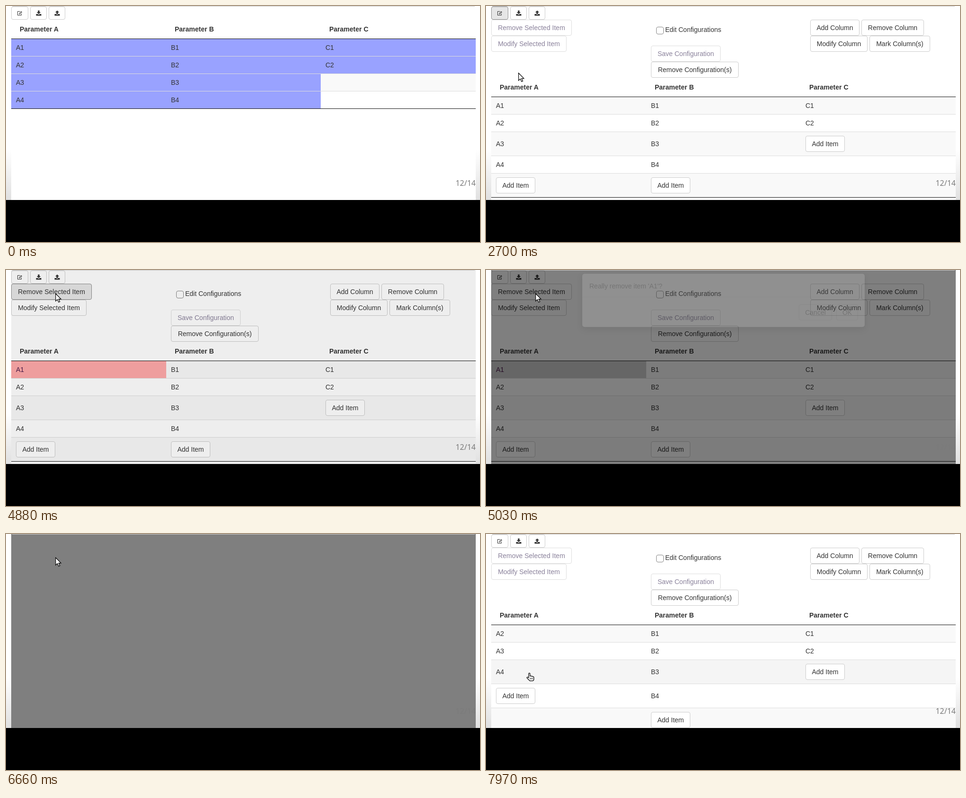
An HTML page for the animation above (8000 ms loop, 1000 by 500 pixels).

```html
<!DOCTYPE html>
<html lang="en">
<head>
<meta charset="utf-8">
<title>Parameter table</title>
<style>
html, body { margin: 0; width: 100%; height: 100%; overflow: hidden; background: #fff; }
#stage { position: relative; width: 1000px; height: 500px; overflow: hidden; color: #333;
  background: linear-gradient(#fff 305px, #e0e0e0 411px);
  font: 14px/20px "Liberation Sans", Arial, sans-serif; white-space: nowrap; }
#stage div, #stage svg { position: absolute; box-sizing: border-box; }
.layer { left: 0; top: 0; width: 1000px; height: 500px; }
#page { clip-path: inset(0 9px 89px 11px); background: #fff; }
#floor { left: 0; top: 411px; width: 1000px; height: 89px; background: #000; }
#edge { left: 13px; top: 0; width: 976px; height: 1px; background: #c8c8c8; }
#count { right: 9px; top: 364px; font: 16px/22px "Noto Sans", "Open Sans", sans-serif; color: #7b7b7b; }
.btn { border: 1px solid #ccc; border-radius: 4px; background: #fff; text-align: center; padding: 6px 0; }
.btn.off { opacity: .65; color: #4c3f66; }
.btn.hover { background: #e6e6e6; border-color: #adadad; }
.btn.focus { background: #e6e6e6; border-color: #8c8c8c; }
.btn.down { background: #d4d4d4; border-color: #8c8c8c; box-shadow: inset 0 3px 5px rgba(0,0,0,.125); }
.btn svg { left: 11px; top: 7px; }
.head { font-weight: 700; }
.row { border-top: 1px solid #ddd; }
.row.first { border-top-color: #111; }
.row.odd { background: #f9f9f9; }
.row.over { background: #f5f5f5; }
.fill { background: #99a2ff; }
.pick { background: #ffa9a9; }
.line { background: #111; height: 1px; left: 11px; width: 980px; }
#box { border: 1px solid #858585; border-radius: 4px; background: #fff; }
#tip { background: #000; color: #fff; border-radius: 4px; font-size: 12px; line-height: 22px; text-align: center; }
#tip::before { content: ""; position: absolute; left: -5px; top: 6px; border: solid transparent;
  border-width: 5px 5px 5px 0; border-right-color: #000; }
#modal { background: #fff; border: 1px solid rgba(0,0,0,.2); border-radius: 6px;
  background-clip: padding-box; box-shadow: 0 5px 15px rgba(0,0,0,.5); }
</style>
</head>
<body>
<div id="stage">
  <div id="page" class="layer">
    <div id="body" class="layer"></div>
    <div id="shade" class="layer" style="background:#000"></div>
    <div id="dialog" class="layer"></div>
    <div id="edge"></div>
  </div>
  <div id="count">12/14</div>
  <div id="floor"></div>
  <svg id="hand" width="18" height="20" viewBox="0 0 18 20">
    <path d="M5 10V2.3Q5 .7 6.4 .7T7.9 2.3V7Q9.3 6.2 10.6 7.4 12 6.8 13.2 8 15.9 7.6 15.9 10V13.5Q15.9 17.2 12.5 17.2H7.5L2.6 12.2Q.6 10.6 1.6 9.5 2.8 8.5 5 10.6Z"
      fill="#fff" stroke="#000" stroke-width="1.3"/>
    <path d="M8.3 10.5v3.5M10.7 10.5v3.5M13.1 10.5v3.5" stroke="#000" stroke-width=".9"/>
  </svg>
  <svg id="arrow" width="14" height="21" viewBox="0 0 14 21">
    <path d="M.7 1V17L4.4 13.6 7 19.3 9.6 18.2 7.1 12.6H12Z" fill="#fff" stroke="#000" stroke-width="1.2"/>
  </svg>
</div>
<script>
const $ = id => document.getElementById(id);
const body = $('body');
const COLS = [11, 338, 664, 991];

function el(parent, cls, x, y, w, h, html = '') {
  const d = document.createElement('div');
  d.className = cls;
  d.style.cssText = `left:${x}px;top:${y}px;` + (w ? `width:${w}px;height:${h}px` : '');
  d.innerHTML = html;
  parent.append(d);
  return d;
}
const layer = parent => el(parent, 'layer', 0, 0, 1000, 500);
const button = (parent, text, x, y, w, h = 34, cls = '') => el(parent, 'btn ' + cls, x, y, w, h, text);
const icon = d => `<svg width="12" height="12" viewBox="0 0 12 12" fill="#333"><path d="${d}"/></svg>`;

const TRAY = 'M.5 8H3.6L6 9.4 8.4 8H11.5V11.5H.5Z';
const PENCIL = 'M1 3Q1 2 2 2H7L6 3H2V10H9V8L10 7V10Q10 11 9 11H2Q1 11 1 10ZM4.5 8.5V6.5L9 2 11 4 6.5 8.5ZM5.3 7V7.8H6L9.5 4.2 8.8 3.5Z';

// rows: [height, a, b, c]; "+" stands for an Add Item button
function table(parent, top, rows, filled) {
  ['A', 'B', 'C'].forEach((c, i) => el(parent, 'head', COLS[i] + 18, top - 30, 0, 0, 'Parameter ' + c));
  let y = top;
  const list = rows.map(([h, ...cells], r) => {
    const row = el(parent, 'row' + (r % 2 ? '' : ' odd') + (r ? '' : ' first'), 11, y, 980, h);
    const out = { row, y, end: y + h, cells: [] };
    cells.forEach((text, c) => {
      const x = COLS[c];
      const cell = el(parent, filled && text ? 'fill' : '', x, y + 1, COLS[c + 1] - x, h - 1);
      if (text === '+') button(cell, 'Add Item', 10, 8, 83);
      else el(cell, '', 10, (h - 21) / 2, 0, 0, text);
      out.cells.push(cell);
    });
    y += h;
    return out;
  });
  el(parent, 'line', 11, y, 980, 1);
  return list;
}

const bar = layer(body);
const edit = button(bar, icon(PENCIL), 11, 1, 36, 28);
button(bar, icon('M4.3 .5H7.7V4H10.2L6 8.2 1.8 4H4.3Z' + TRAY), 51, 1, 35, 28);
button(bar, icon('M4.3 8V4.5H1.8L6 .5 10.2 4.5H7.7V8Z' + TRAY), 90, 1, 35, 28);

const tools = layer(body);
const remove = button(tools, 'Remove Selected Item', 11, 29, 170);
const modify = button(tools, 'Modify Selected Item', 11, 63, 159);
el(tools, '', 359, 44, 16, 16).id = 'box';
el(tools, '', 378, 40, 0, 0, 'Edit Configurations');
button(tools, 'Save Configuration', 348, 84, 147, 34, 'off');
button(tools, 'Remove Configuration(s)', 348, 118, 185);
button(tools, 'Add Column', 684, 29, 104);
button(tools, 'Remove Column', 792, 29, 132);
button(tools, 'Modify Column', 684, 63, 121);
button(tools, 'Mark Column(s)', 809, 63, 128);

const view = layer(body), before = layer(body), after = layer(body);
table(view, 69, [[37, 'A1', 'B1', 'C1'], [37, 'A2', 'B2', 'C2'], [37, 'A3', 'B3', ''], [37, 'A4', 'B4', '']], true);
const rows1 = table(before, 192,
  [[37, 'A1', 'B1', 'C1'], [37, 'A2', 'B2', 'C2'], [51, 'A3', 'B3', '+'], [37, 'A4', 'B4', ''], [51, '+', '+', '']]);
const rows2 = table(after, 192,
  [[37, 'A2', 'B1', 'C1'], [37, 'A3', 'B2', 'C2'], [51, 'A4', 'B3', '+'], [51, '+', 'B4', ''], [51, '', '+', '']]);
const first = rows1[0].cells[0];

const tip = el(body, '', 55, 4, 111, 22, 'Toggle Edit Mode');
tip.id = 'tip';

const modal = el($('dialog'), '', 202, 32, 598, 115);
modal.id = 'modal';
el(modal, '', 15, 16, 0, 0, "Really remove item 'A1'?");
el(modal, '', 0, 49, 596, 1).style.background = '#e5e5e5';
const cancel = button(modal, 'Cancel', 457, 65, 70);
const ok = button(modal, 'OK', 536, 65, 46);

// cursor legs: start, end, from x, y, to x, y
const LEGS = [
  [620, 900, -14, 34, 34, 20],
  [2270, 2940, 34, 20, 86, 207],
  [3740, 4380, 86, 207, 104, 49],
  [7240, 7680, 104, 49, 96, 272],
  [7930, 7970, 96, 272, 91, 294]
];
const STEP = 40;

function cursorAt(t) {
  let pos = [-30, 34];
  for (const [a, b, x0, y0, x1, y1] of LEGS) {
    if (t < a) break;
    const p = Math.min(1, (Math.floor((t - a) / STEP) + 1) / (Math.floor((b - a) / STEP) + 1));
    pos = [x0 + (x1 - x0) * p, y0 + (y1 - y0) * p];
  }
  return pos.map(Math.round);
}

const ramp = (t, a, d) => Math.max(0, Math.min(1, (t - a) / d));
const show = (node, on) => node.style.display = on ? '' : 'none';
const state = (node, name) => ['off', 'hover', 'focus', 'down'].forEach(c => node.classList.toggle(c, c === name));

function render(t) {
  const [x, y] = cursorAt(t);
  const covered = t >= 4840 && t < 7130;
  const editing = t >= 1530;
  const picked = t >= 3290 && t < 7130;
  const blank = t >= 6650 && t < 7130;

  show(body, !blank);
  show(tools, editing);
  show(view, !editing);
  show(before, editing && t < 7130);
  show(after, t >= 7130);

  const onEdit = x >= 11 && x < 47 && y < 29;
  const onRemove = x >= 11 && x < 181 && y >= 29 && y < 63;
  const editFocus = t >= 1250 && t < 3080;
  state(edit, t >= 1250 && t < 1330 ? 'down' : editFocus ? 'focus' : onEdit ? 'hover' : '');
  state(remove, !picked ? 'off' : t >= 4550 && t < 4700 ? 'down'
    : t >= 4700 && t < 4930 ? 'focus' : onRemove && t < 4700 ? 'hover' : '');
  state(modify, picked ? '' : 'off');
  tip.style.opacity = .93 * (ramp(t, 900, 150) - ramp(t, 2310, 150));

  for (const r of [...rows1, ...rows2])
    r.row.classList.toggle('over', editing && !covered && y > r.y && y <= r.end);
  first.classList.toggle('pick', picked);
  first.style.background = t >= 4930 && picked ? '#cecece' : '';
  first.style.color = picked ? '#4a1a4a' : '';

  $('shade').style.opacity = .5 * (ramp(t, 4861, 150) - ramp(t, 6715, 150));
  const slide = (1 - ramp(t, 5011, 300)) ** 2 + ramp(t, 6415, 300) ** 2;
  modal.style.opacity = ramp(t, 5011, 150) - ramp(t, 6415, 150);
  modal.style.transform = `translateY(${-29 * slide}px)`;
  state(cancel, t >= 5450 && t < 5860 ? 'focus' : '');
  state(ok, t >= 6390 ? 'down' : t >= 5860 ? 'focus' : '');

  const pointing = !covered && (onEdit || onRemove && picked || editing && y > 155);
  show($('hand'), pointing);
  show($('arrow'), !pointing);
  $('hand').style.transform = `translate(${x - 6}px,${y}px)`;
  $('arrow').style.transform = `translate(${x}px,${y}px)`;
}

const start = performance.now();
(function loop() {
  render((performance.now() - start) % 8000);
  requestAnimationFrame(loop);
})();
</script>
</body>
</html>
```
